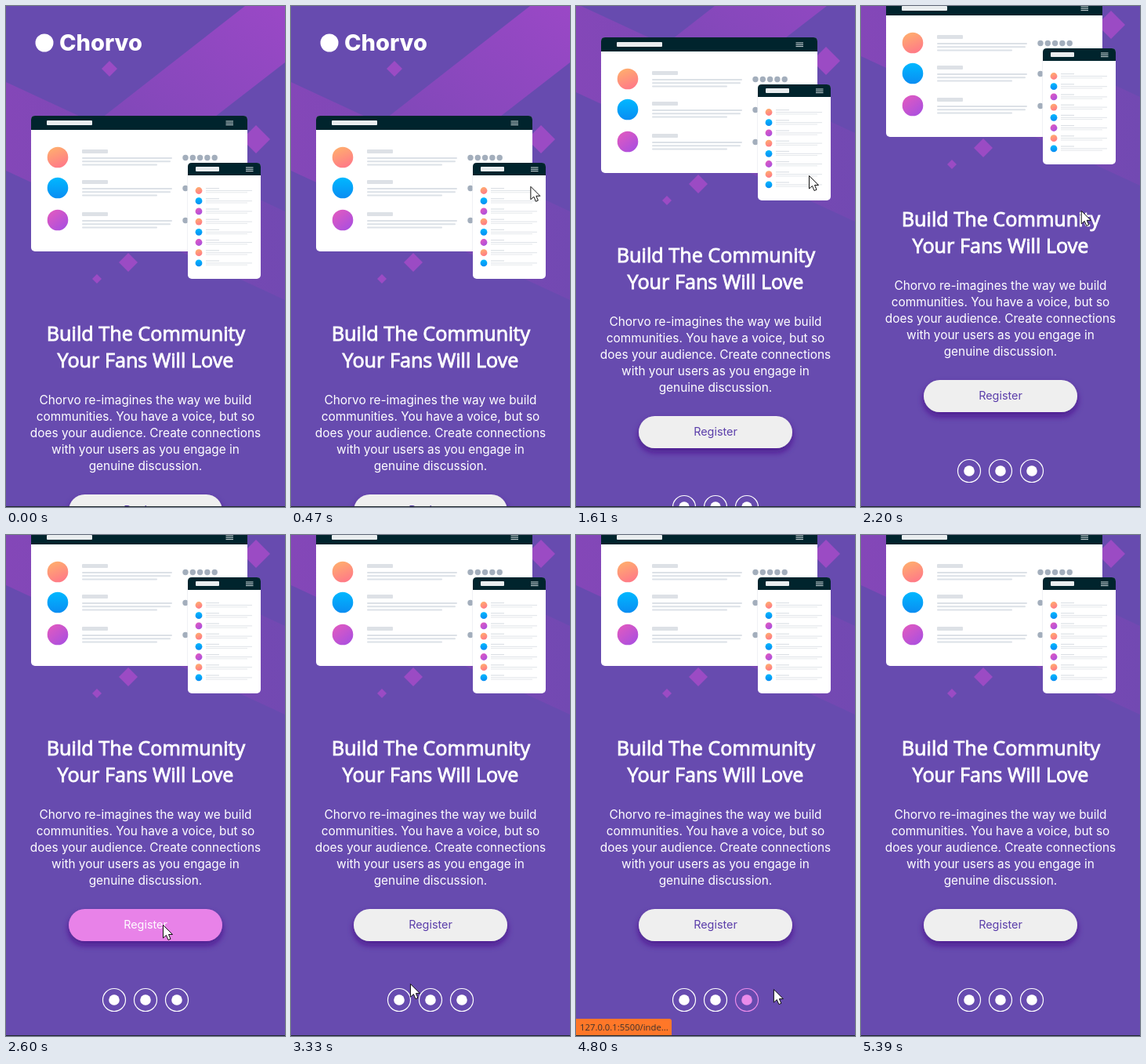
Recreate the animation shown at these times as an HTML page. Size 356 px wide and 639 px high, loop 5460 ms.

```html
<!DOCTYPE html>
<html lang="en">
<head>
<meta charset="utf-8">
<title>Community landing page</title>
<style>
  html, body { margin: 0; width: 100%; height: 100%; overflow: hidden; background: #674baf; }
  svg { display: block; width: 356px; height: 639px; }
  text { font-family: Inter, sans-serif; fill: #fff; }
  .brand { font-size: 29px; font-weight: 800; }
  .title { font: 25.2px "Open Sans", sans-serif; text-anchor: middle; stroke: #fff; stroke-width: .9; }
  .copy { font-size: 15.4px; text-anchor: middle; }
  .button { font-size: 14.4px; text-anchor: middle; }
  .status { font: 11.3px "Open Sans", sans-serif; fill: #3d302c; }
</style>
</head>
<body>
<svg viewBox="0 0 356 639">
  <defs>
    <linearGradient id="orange" x2=".4" y2="1"><stop stop-color="#ffb36b"/><stop offset="1" stop-color="#ff7d86"/></linearGradient>
    <linearGradient id="blue" x2="0" y2="1"><stop stop-color="#00b8ff"/><stop offset="1" stop-color="#0a8df2"/></linearGradient>
    <linearGradient id="pink" x2=".8" y2="1"><stop stop-color="#e65bbd"/><stop offset="1" stop-color="#a94fe0"/></linearGradient>
    <linearGradient id="beamLeft"><stop stop-color="#8447b8"/><stop offset="1" stop-color="#7249b2"/></linearGradient>
    <linearGradient id="beamRight" x1="1" x2="0" y2="1"><stop stop-color="#9a48c6"/><stop offset="1" stop-color="#7c48b6"/></linearGradient>
    <filter id="shadow" x="-20%" y="-40%" width="140%" height="200%">
      <feDropShadow dx="0" dy="5" stdDeviation="4.5" flood-color="#470a8a" flood-opacity=".85"/>
    </filter>
  </defs>
  <rect width="356" height="639" fill="#674baf"/>
  <g id="page">
    <path d="M0 97L356 262V375L0 210Z" fill="url(#beamLeft)"/>
    <path d="M305 0H356V72L200 193L118 146Z" fill="url(#beamRight)"/>
    <g id="diamonds" fill="#9b4bc4"></g>
    <circle cx="49" cy="47" r="11.5" fill="#fff"/>
    <text class="brand" x="68" y="57">Chorvo</text>
    <g id="mockups"></g>
    <text class="title" x="178.5" y="427">Build The Community</text>
    <text class="title" x="178" y="461">Your Fans Will Love</text>
    <g id="copy"></g>
    <rect id="button" x="80" y="623" width="196" height="41" rx="20.5" filter="url(#shadow)"/>
    <text id="label" class="button" x="178" y="648">Register</text>
    <g id="social"></g>
  </g>
  <g id="status">
    <path d="M0 617H119Q122 617 122 620V639H0Z" fill="#ff7728"/>
    <text class="status" x="5" y="632">127.0.0.1:5500/inde...</text>
  </g>
  <rect y="638" width="356" height="1" fill="#202a30"/>
  <path id="cursor" d="M0 0V16.5L4 13L6.5 19L9.5 17.7L7 12H12Z" fill="#fff" stroke="#111" stroke-linejoin="round"/>
</svg>
<script>
const LOOP = 5460;
const $ = id => document.getElementById(id);
const clamp = v => Math.max(0, Math.min(1, v));
const ramp = (t, from, to) => clamp((t - from) / (to - from));
const smooth = v => v * v * (3 - 2 * v);
const mix = (a, b, k) => `rgb(${a.map((v, i) => Math.round(v + (b[i] - v) * k))})`;

const WHITE = [255, 255, 255], PALE = [239, 239, 239], MAGENTA = [232, 130, 232], PURPLE = [91, 62, 170];
const avatars = ['orange', 'blue', 'pink'];

const rect = (x, y, w, h, fill, r = 0) =>
  `<rect x="${x}" y="${y}" width="${w}" height="${h}" rx="${r}" fill="${fill}"/>`;
const dot = (x, y, r, fill) => `<circle cx="${x}" cy="${y}" r="${r}" fill="${fill}"/>`;

function panel(x, y, w, h, bar, pillX, pillWidth, menuX) {
  const middle = y + bar / 2;
  return rect(x, y, w, h, '#fff', 5) +
    `<path d="M${x} ${y + bar}v${5 - bar}q0-5 5-5h${w - 10}q5 0 5 5v${bar - 5}z" fill="#00242d"/>` +
    rect(pillX, middle - 3, pillWidth, 6, '#e9edef', 1) +
    [0, 2.3, 4.6].map(d => rect(menuX, middle - 2.5 + d, 9.5, 1, '#d5dde0')).join('');
}

function buildMockups() {
  let out = panel(32, 140, 276, 173, 18, 52, 58, 280.5);
  [193, 232, 273].forEach((y, row) => {
    out += dot(66, y, 13.3, `url(#${avatars[row]})`) + rect(97, y - 10, 33, 5, '#dde1e6', 1);
    [115, 113, 96].forEach((w, i) => out += rect(97, y + i * 4.3, w, 2, '#dce1e7', 1));
    for (let i = 0; i < (row ? 1 : 5); i++) out += dot(229 + i * 9.3, y + .5, 3.7, '#a3aebc');
  });
  out += rect(231.4, 216, 1, 97, '#e6e8ee') + panel(232, 200, 93, 148, 16, 242, 30, 306);
  for (let i = 0; i < 8; i++) {
    const y = 235.5 + i * 13.2;
    out += dot(246, y, 4.4, `url(#${avatars[i % 3]})`) + rect(255, y - 3.5, 17, 1.2, '#dde1e6') +
      rect(255, y - .5, 59, 1, '#dfe3e8') + rect(255, y + 1.8, 53, 1, '#e5e8ec');
  }
  return out;
}

$('diamonds').innerHTML = [[132, 80, 10], [319, 170, 18], [156, 327, 12], [116, 348, 6]]
  .map(([x, y, r]) => `<path d="M${x - r} ${y}l${r}-${r}l${r} ${r}l-${r} ${r}z"/>`).join('');
$('mockups').innerHTML = buildMockups();
$('copy').innerHTML = [
  'Chorvo re-imagines the way we build',
  'communities. You have a voice, but so',
  'does your audience. Create connections',
  'with your users as you engage in',
  'genuine discussion.'
].map((line, i) => `<text class="copy" x="178" y="${508 + i * 21}">${line}</text>`).join('');
$('social').innerHTML = [138, 178, 218].map(x =>
  `<g><circle cx="${x}" cy="739" r="14.5" fill="none" stroke-width="1.2"/><circle cx="${x}" cy="739" r="6.8" stroke="none"/></g>`).join('');

// Pointer positions: time, x, y
const path = [
  [20, 360, 320], [540, 297, 216], [2010, 297, 216], [2200, 281, 260], [2480, 200, 497],
  [2940, 200, 497], [3330, 152, 572], [3470, 143, 594], [3530, 143, 594], [4060, 180, 596],
  [4080, 180, 596], [4140, 194, 598], [4470, 221, 596], [4670, 221, 596], [5260, 360, 520]
];

function pointerAt(t) {
  const i = path.findIndex(p => p[0] > t);
  if (i < 1) return path[i < 0 ? path.length - 1 : 0].slice(1);
  const [a, b] = [path[i - 1], path[i]], k = ramp(t, a[0], b[0]);
  return [a[1] + (b[1] - a[1]) * k, a[2] + (b[2] - a[2]) * k];
}

const fade = (t, enter, leave, span = 150) => ramp(t, enter, enter + span) - ramp(t, leave, leave + span);
const hovers = [[3400, 3680], [3830, 4130], [4270, 4790]];

function draw(t) {
  const scroll = 100 * smooth(ramp(t, 1210, 1410)) + 46 * smooth(ramp(t, 1610, 1810));
  $('page').setAttribute('transform', `translate(0 ${-scroll})`);

  const press = fade(t, 2440, 3040);
  $('button').setAttribute('fill', mix(PALE, MAGENTA, press));
  $('label').style.fill = mix(PURPLE, WHITE, press);

  [...$('social').children].forEach((icon, i) => {
    const color = mix(WHITE, MAGENTA, fade(t, ...hovers[i]));
    icon.setAttribute('fill', color);
    icon.setAttribute('stroke', color);
  });

  $('status').setAttribute('opacity', fade(t, 3430, 5060));
  const [x, y] = pointerAt(t);
  $('cursor').setAttribute('transform', `translate(${x + .5} ${y + .5})`);
  $('cursor').setAttribute('visibility', t < 70 || t > 5260 ? 'hidden' : 'visible');
}

function tick() {
  draw(performance.now() % LOOP);
  requestAnimationFrame(tick);
}
tick();
</script>
</body>
</html>
```
